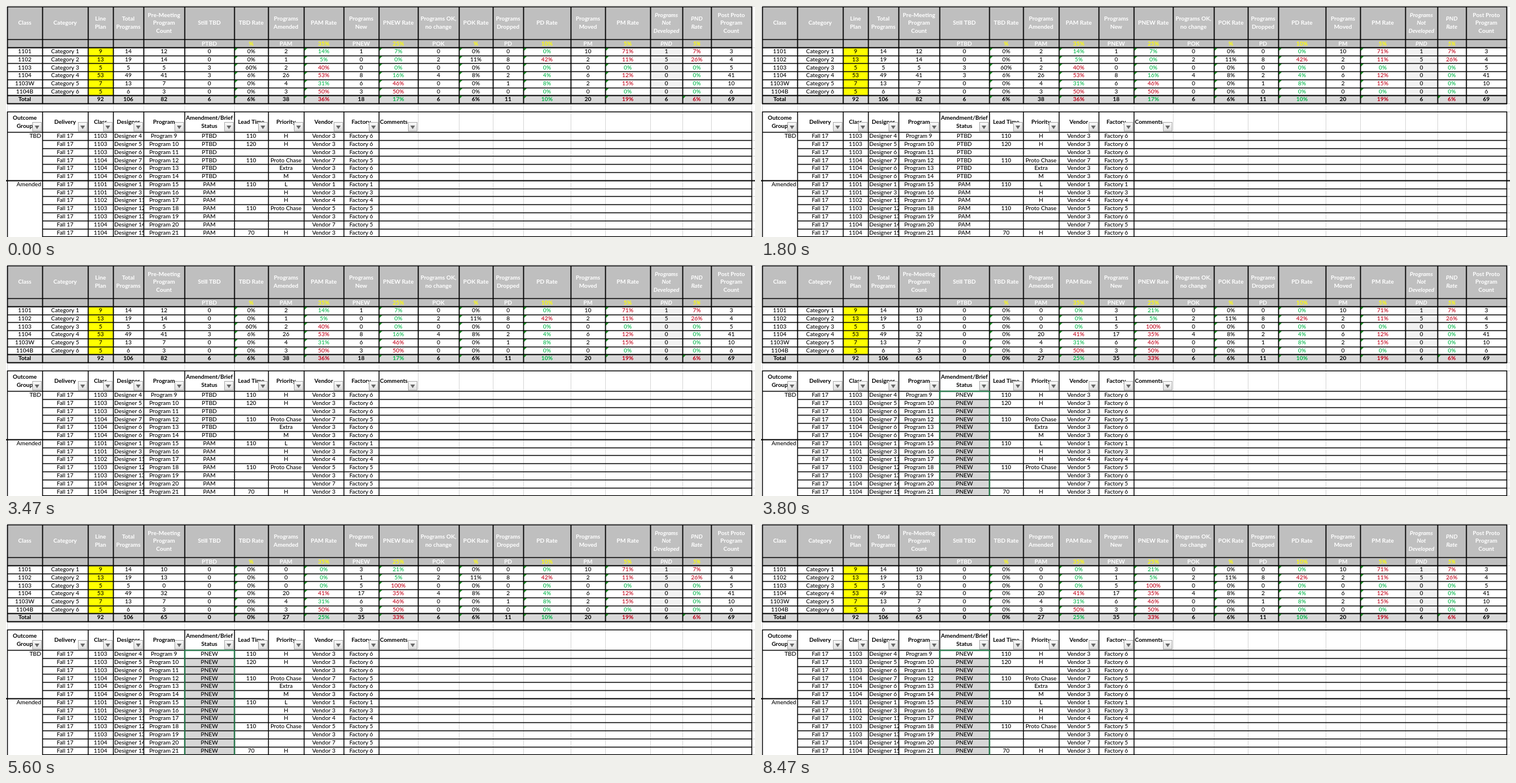
Write an HTML page with a canvas that moves like this. It is 1280 px wide and 396 px high and loops after 8540 ms.

```html
<!DOCTYPE html>
<html lang="en">
<head>
<meta charset="utf-8">
<title>Line plan</title>
<style>
html, body { margin: 0; width: 100%; height: 100%; overflow: hidden; background: #fff; }
canvas { display: block; }
</style>
</head>
<body>
<canvas id="sheet" width="1280" height="396"></canvas>
<script>
const ctx = document.getElementById('sheet').getContext('2d');
const W = 1280, H = 396, LOOP = 8540, EDIT_AT = 3670;
const BLACK = '#000', WHITE = '#fff', YELLOW = '#ffff00', GRID = '#d6d6d6';
const RED = '#c00018', GREEN = '#00b548', SELECT = '#1f7a48';

// Column: width, heading, key of its count, limit of its rate.
const columns = [
  [60, 'Class'], [78, 'Category'], [43, 'Line|Plan', 'line'], [52, 'Total|Programs', 'total'],
  [70, 'Pre-Meeting|Program|Count', 'pre'],
  [85, 'Still TBD', 'PTBD'], [58, 'TBD Rate', 'PTBD', Infinity],
  [61, 'Programs|Amended', 'PAM'], [68, 'PAM Rate', 'PAM', 35],
  [60, 'Programs|New', 'PNEW'], [67, 'PNEW Rate', 'PNEW', 25],
  [70, 'Programs OK,|no change', 'POK'], [58, 'POK Rate', 'POK', Infinity],
  [52, 'Programs|Dropped', 'PD'], [81, 'PD Rate', 'PD', 10],
  [59, 'Programs|Moved', 'PM'], [77, 'PM Rate', 'PM', 5],
  [55, 'Programs|Not|Developed', 'PND'], [49, 'PND|Rate', 'PND', 5],
  [69, 'Post Proto|Program|Count', 'post']
].map(([width, head, key, limit]) => ({ width, head, key, limit }));

let edge = 2;
for (const col of columns) {
  col.x = edge;
  edge += col.width;
  col.end = edge;
  col.mid = (col.x + col.end) / 2;
}
const edges = [...columns.map(c => c.x), edge];
const status = columns[5];

// Counts that do not come from the list below; missing means none.
const classes = {
  '1101': { line: 9, total: 14, PNEW: 1, PM: 10, PND: 1 },
  '1102': { line: 13, total: 19, POK: 2, PD: 8, PM: 2, PND: 5 },
  '1103': { line: 5, total: 5 },
  '1103W': { line: 7, total: 13, PAM: 4, PNEW: 6, PD: 1, PM: 2 },
  '1104': { line: 53, total: 49, PAM: 20, PNEW: 8, POK: 4, PD: 2, PM: 6 },
  '1104B': { line: 5, total: 6, PAM: 3, PNEW: 3 }
};

const TBD_ROWS = 6;
const chase = { lead: 110, priority: 'Proto Chase', factory: 5 };
const high = { priority: 'H' };
const items = [
  { cls: '1103', designer: 4, lead: 110, ...high },
  { cls: '1103', designer: 5, lead: 120, ...high },
  { cls: '1103' },
  { cls: '1104', designer: 7, vendor: 7, ...chase },
  { cls: '1104', priority: 'Extra' },
  { cls: '1104', priority: 'M' },
  { cls: '1101', designer: 1, lead: 110, priority: 'L', vendor: 1, factory: 1 },
  { cls: '1101', designer: 3, factory: 3, ...high },
  { cls: '1102', vendor: 4, factory: 4, ...high },
  { cls: '1103', vendor: 5, ...chase },
  { cls: '1103' },
  { cls: '1104', vendor: 7, factory: 5 },
  { cls: '1104', lead: 70, ...high },
  ...Array(4).fill({ cls: '1104' }) // below the fold, but counted
].map((item, i) => ({ designer: i < 8 ? 6 : i + 3, vendor: 3, factory: 6, lead: '', priority: '', ...item }));

const listHeads = ['Outcome|Group', 'Delivery', 'Class', 'Designer', 'Program', 'Amendment/Brief|Status',
  'Lead Time', 'Priority', 'Vendor', 'Factory', 'Comments'];

const statusOf = (i, edited) => edited ? 'PNEW' : i < TBD_ROWS ? 'PTBD' : 'PAM';

function summarize(edited) {
  const rows = Object.entries(classes).map(([cls, base]) => {
    const r = { line: 0, total: 0, PTBD: 0, PAM: 0, PNEW: 0, POK: 0, PD: 0, PM: 0, PND: 0, ...base };
    items.forEach((item, i) => { if (item.cls === cls) r[statusOf(i, edited)]++; });
    r.pre = r.total - r.PNEW - r.PND;
    r.post = r.total - r.PD - r.PM - r.PND;
    return r;
  });
  const total = {};
  for (const key in rows[0]) total[key] = rows.reduce((sum, r) => sum + r[key], 0);
  return [...rows, total];
}
const before = summarize(false), after = summarize(true);

const rowY = i => Math.round(71 + 13.7 * i);
const listY = i => Math.round(216 + 13.8 * i);

function box(x, y, w, h, color) {
  ctx.fillStyle = color;
  ctx.fillRect(x, y, w, h);
}
const hLine = (y, x0, x1, w = 1.5, color = BLACK) => box(x0, y + 0.5 - w / 2, x1 - x0, w, color);
const vLine = (x, y0, y1, w = 1.5, color = BLACK) => box(x + 0.5 - w / 2, y0, w, y1 - y0, color);

function text(s, x, y, { color = BLACK, style = '500', align = 'center' } = {}) {
  ctx.font = `${style} 9.9px Lato, "Open Sans", sans-serif`;
  ctx.fillStyle = color;
  ctx.textAlign = align;
  ctx.fillText(s, x, y + 3.2);
}

function lines(s, x, y, opts) {
  const parts = s.split('|');
  parts.forEach((p, i) => text(p, x, y + (i - (parts.length - 1) / 2) * 13.6, opts));
}

function triangle(points, color) {
  ctx.fillStyle = color;
  ctx.beginPath();
  points.forEach(p => ctx.lineTo(...p));
  ctx.fill();
}

function filterButton(x) {
  const g = ctx.createLinearGradient(0, 199, 0, 215);
  g.addColorStop(0, '#fafafa');
  g.addColorStop(1, '#dedede');
  box(x - 8, 199, 16, 16, '#a9a9a9');
  box(x - 7, 200, 14, 14, g);
  triangle([[x - 4, 205], [x + 4, 205], [x, 211]], '#686868');
}

function gridlines() {
  edges.forEach(x => vLine(x, 168, H, 1, GRID));
  [0, 71, 167, 181, 216].forEach(y => hLine(y, edge, W, 1, GRID));
  for (let i = 1; i < 14; i++) hLine(listY(i), edge, W, 1, GRID);
}

function headings() {
  box(2, 1, edge - 2, rowY(0) - 1, '#bfbfbf');
  for (const { head, key, limit, mid } of columns) {
    const style = key === 'PND' ? 'italic bold' : 'bold';
    lines(head, mid, 29, { color: WHITE, style });
    if (limit) text((isFinite(limit) ? limit : '') + '%', mid, 64.5, { color: YELLOW, style });
    else if (key && key[0] === 'P') text(key, mid, 64.5, { color: WHITE, style });
  }
}

function summary(rows) {
  const top = rowY(0), foot = rowY(6), end = rowY(7);
  const fillColumn = (key, color) => {
    const col = columns.find(c => c.key === key);
    box(col.x, top, col.width, foot - top, color);
  };
  headings();
  fillColumn('line', YELLOW);
  fillColumn('PND', '#f2f2f2');
  box(2, foot, edge - 2, end - foot, '#d9d9d9');

  for (let i = -1; i < 8; i++) hLine(rowY(i), 2, edge + 1, i % 6 && i < 7 ? 1.5 : 2);
  hLine(1, 2, edge + 1);
  edges.forEach(x => vLine(x, 1, end + 1, 1.8));

  const names = [...Object.keys(classes), 'Total'];
  rows.forEach((row, r) => {
    const y = 78 + 13.7 * r, isTotal = r === 6, style = isTotal ? 'bold' : '500';
    text(names[r], columns[0].mid, y, { style });
    if (!isTotal) text('Category ' + (r + 1), columns[1].mid, y);
    for (const { x, mid, key, limit } of columns.slice(2)) {
      if (!limit) {
        text(row[key], mid, y, { style });
        continue;
      }
      const rate = Math.round(100 * row[key] / row.total);
      const color = !isFinite(limit) ? BLACK : rate > limit ? RED : GREEN;
      text(rate + '%', mid, y, { style, color });
      if (key !== 'PND' || isTotal) {
        const tx = x + 1, ty = rowY(r) + 1;
        triangle([[tx, ty], [tx + 5, ty], [tx, ty + 5]], '#15801c');
      }
    }
  });
}

function clippedText(s, col, y) {
  ctx.save();
  ctx.beginPath();
  ctx.rect(col.x + 1, y - 7, col.width - 1, 14);
  ctx.clip();
  text(s, col.x + 2, y, { align: 'left' });
  ctx.restore();
}

function list(edited) {
  if (edited) box(status.x, listY(1), status.width, H - listY(1), '#d6d6d6');
  hLine(181, 2, edge + 1);
  hLine(216, 2, edge + 1);
  for (let i = 1; i < 14; i++) {
    if (i === TBD_ROWS) hLine(listY(i), 0, W, 2);
    else hLine(listY(i), 62, edge + 1);
  }
  edges.slice(0, 11).forEach(x => vLine(x, 181, H));
  vLine(edge, 181, H);

  listHeads.forEach((head, c) => {
    const { x, mid, end } = columns[c], style = 'bold';
    if (head === 'Comments') text(head, x + 2, 198.5, { style, align: 'left' });
    else lines(head, mid, 198.5, { style });
    filterButton(end - 9);
  });

  text('TBD', 60, 223, { align: 'right' });
  text('Amended', 60, 306, { align: 'right' });
  items.forEach(({ cls, designer, lead, priority, vendor, factory }, i) => {
    const y = 223 + 13.78 * i;
    const cells = ['', 'Fall 17', cls, '', 'Program ' + (9 + i), statusOf(i, edited),
      lead, priority, 'Vendor ' + vendor, 'Factory ' + factory];
    cells.forEach((s, c) => text(s, columns[c].mid, y));
    clippedText('Designer ' + designer, columns[3], y);
  });

  if (edited) {
    hLine(216, status.x, status.end, 2, SELECT);
    vLine(status.x, 216, H, 2, SELECT);
    vLine(status.end, 216, H, 2, SELECT);
  }
}

function draw(time) {
  const edited = time % LOOP >= EDIT_AT;
  box(0, 0, W, H, WHITE);
  gridlines();
  summary(edited ? after : before);
  list(edited);
}

let start;
function tick(now) {
  start ??= now;
  draw(now - start);
  requestAnimationFrame(tick);
}
draw(0);
requestAnimationFrame(tick);
</script>
</body>
</html>
```
